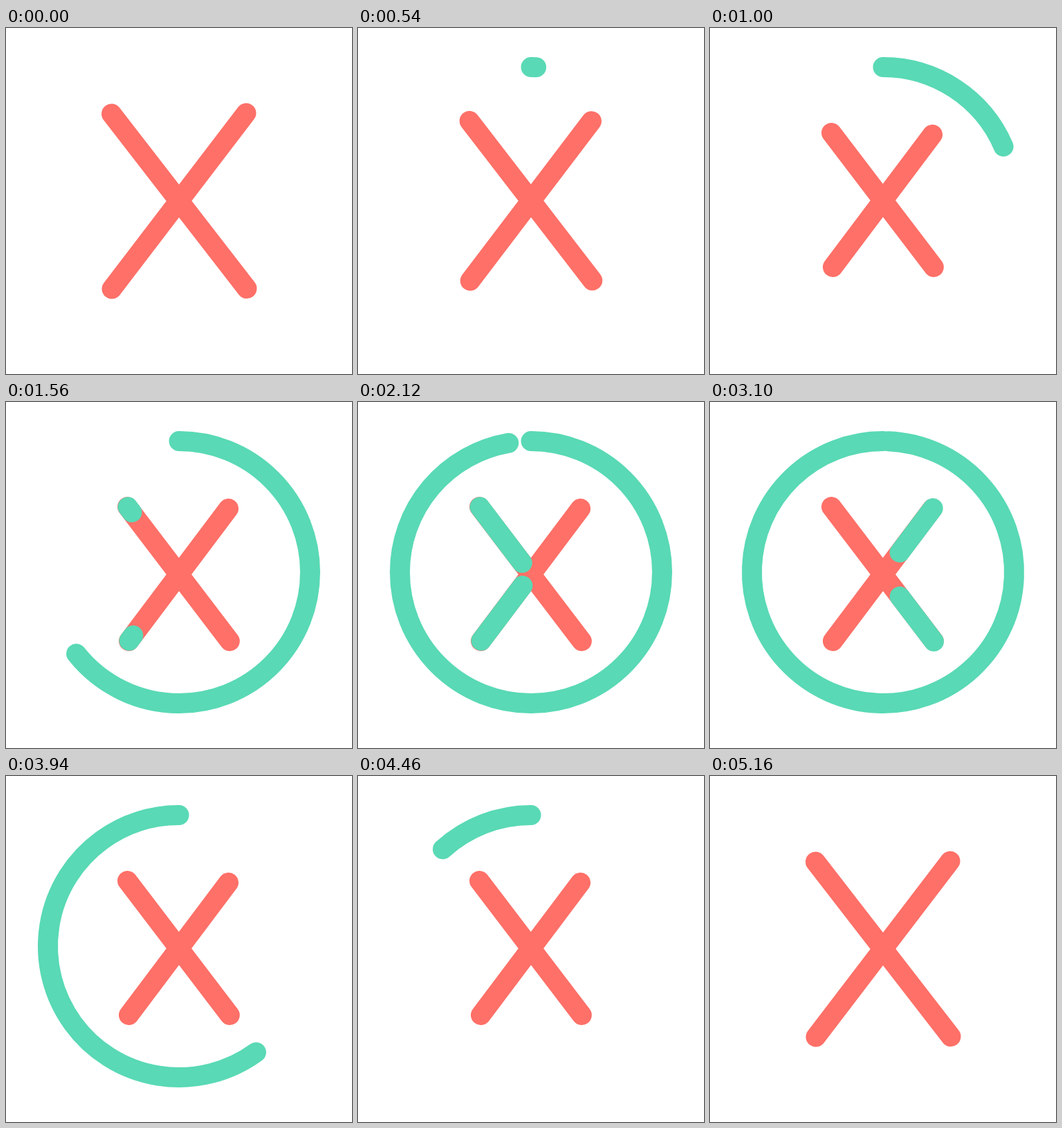
Write an HTML page with a canvas that moves like this. It is 500 px wide and 500 px high and loops after 6040 ms.

```html
<!DOCTYPE html>
<html lang="en">
<head>
<meta charset="utf-8">
<title>Cross and ring</title>
<style>
  html, body { margin: 0; width: 100%; height: 100%; overflow: hidden; background: #fff; }
  canvas { display: block; width: 100vmin; height: 100vmin; }
</style>
</head>
<body>
<canvas id="stage" width="500" height="500"></canvas>
<script>
const ctx = document.getElementById('stage').getContext('2d');
const RED = '#fe7068', GREEN = '#59d9b5';
const LOOP = 6040, START = 260, END = 5160, LAST_STEP = 106;

// Each bar: x1, y1, x2, y2
const LARGE = [[152.5, 124, 348, 376.5], [153, 377, 347, 123]];
const SMALL = [[175.5, 151.5, 323.3, 345.5], [177.5, 345.5, 321.5, 154]];
const OVERLAY = [[176, 151.7, 323.5, 346], [178, 345, 322.2, 153.5]];

const clamp = x => Math.min(1, Math.max(0, x));
const mix = (a, b, p) => a + (b - a) * p;
const easeInOut = u => u < 0.5 ? 2 * u * u : 1 - 2 * (1 - u) ** 2;
const tween = (step, from, length) => easeInOut(clamp((step - from) / length));

// Steps come in threes: two short ones of 20 ms, then one of 100 ms.
function stepAt(time) {
  if (time < START) return 0;
  if (time >= END) return LAST_STEP;
  const t = time - START;
  return 1 + 3 * Math.floor(t / 140) + Math.min(2, Math.floor(t % 140 / 20));
}

function drawBar([x1, y1, x2, y2], color, tail = 0, head = 1) {
  if (head <= 0 || tail >= head) return;
  ctx.strokeStyle = color;
  ctx.beginPath();
  ctx.moveTo(mix(x1, x2, tail), mix(y1, y2, tail));
  ctx.lineTo(mix(x1, x2, head), mix(y1, y2, head));
  ctx.stroke();
}

function drawRing(tail, head) {
  if (head <= 0 || tail >= head) return;
  const angle = p => (p * 2 - 0.5) * Math.PI;
  ctx.strokeStyle = GREEN;
  ctx.beginPath();
  ctx.arc(250, 246, 189.5, angle(tail), angle(head));
  ctx.stroke();
}

function draw(step) {
  ctx.clearRect(0, 0, 500, 500);
  ctx.lineWidth = 29;
  ctx.lineCap = 'round';

  const shrink = tween(step, 0.5, 15) - tween(step, 91, 15);
  LARGE.forEach((bar, i) =>
    drawBar(bar.map((v, k) => mix(v, SMALL[i][k], shrink)), RED));

  const ringHead = clamp(1.03 * tween(step, 4.5, 45));
  const ringTail = clamp((0.0307 * Math.max(0, step - 60.4)) ** 2);
  drawRing(ringTail, ringHead);

  const sweep = 2 * tween(step, 24.6, 54);
  OVERLAY.forEach(bar => drawBar(bar, GREEN, clamp(sweep - 1), clamp(sweep)));
}

function frame() {
  draw(stepAt(performance.now() % LOOP));
  requestAnimationFrame(frame);
}
frame();
</script>
</body>
</html>
```
